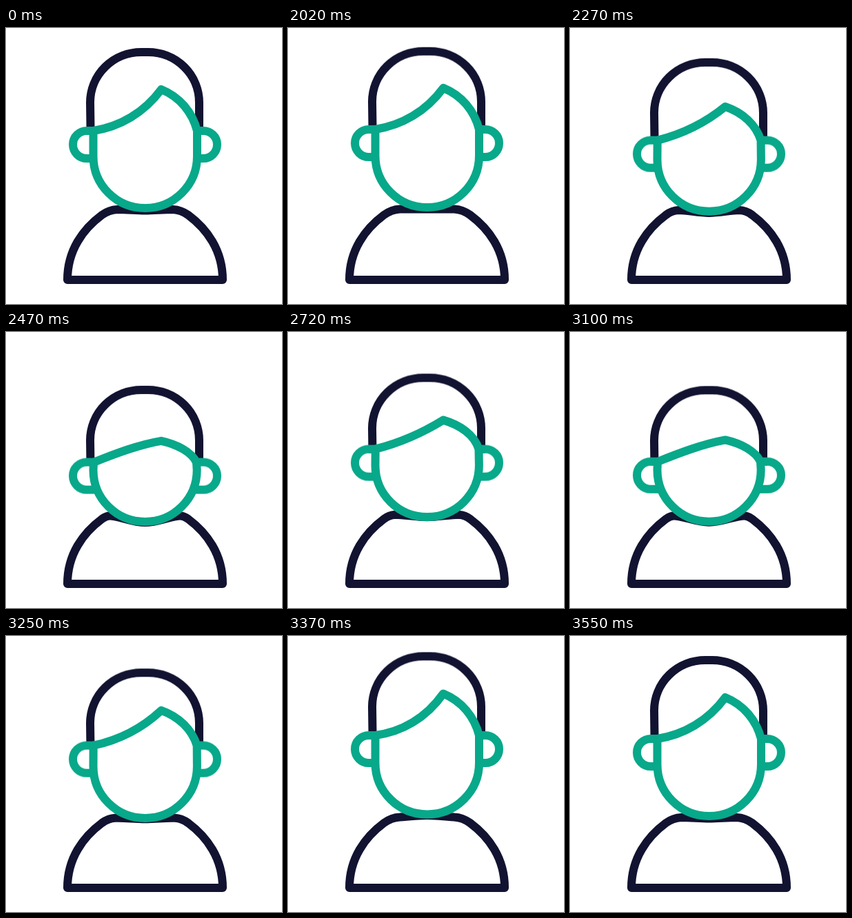
These frames come from a looping animation (400 by 400 pixels, 3.57 s). An HTML page without scripts:

```html
<!DOCTYPE html>
<html lang="en">
<head>
<meta charset="utf-8">
<title>Nodding avatar</title>
<style>
  html, body { margin: 0; width: 100%; height: 100%; overflow: hidden; background: #fff; }
  svg { display: block; width: 100%; height: 100%; }
  path { fill: none; stroke-width: 12; stroke-linejoin: round; }
  .dark { stroke: #121331; }
  .green { stroke: #08a88a; }
  .hair, .ears, .face, .body { animation: 3570ms ease-in-out infinite; }
  .hair { animation-name: hair; }
  .ears { animation-name: ears; }
  .face { animation-name: face; }
  .body { animation-name: body; }

  /* Rest, lift, nod, half rise, nod, overshoot, rest. Hair trails slightly. */
  @keyframes hair {
    0%, 56.5%, 99.44%, 100% { transform: translateY(0); }
    56.58% { transform: translateY(-1.2px); animation-timing-function: ease-out; }
    59.1% { transform: translateY(-4px); }
    70.03%, 86.55% { transform: translateY(49.5px); }
    78.43% { transform: translateY(28.4px); }
    94.96% { transform: translateY(-6px); }
  }
  @keyframes ears {
    0%, 56.5%, 99.44%, 100% { transform: translateY(0); }
    56.58% { transform: translateY(-2px); animation-timing-function: ease-out; }
    58.82% { transform: translateY(-4px); }
    69.61%, 85.99% { transform: translateY(39.7px); }
    78.01% { transform: translateY(18.7px); }
    94.4% { transform: translateY(-5px); }
  }
  @keyframes face {
    0%, 56.5%, 99.44%, 100% { d: path("M126.5 149C165 143 200 123 225 89C252 100 270 122 277 149L277 186C277 227.4 243.3 261 201.7 261C160 261 126.5 227.4 126.5 186Z"); }
    56.58% { d: path("M126.5 147C165 141 200 121 225 87C252 98 270 120 277 147L277 185C277 226.4 243.3 260 201.7 260C160 260 126.5 226.4 126.5 185Z"); animation-timing-function: ease-out; }
    58.82% { d: path("M126.5 145C165 139 200 119 225 84C252 95 270 117 277 145L277 184.5C277 226 243.3 259.5 201.7 259.5C160 259.5 126.5 226 126.5 184.5Z"); }
    69.61%, 85.99% { d: path("M127 189C160 175.5 192 163.5 225 158C248 163 269 174 276 189L276.7 200C276.7 241.5 243 275 201.7 275C160 275 126.5 241.5 126.5 200Z"); }
    78.01% { d: path("M126.7 167.7C162.6 159 196 144 225 124.5C250 132 270.5 147 276.5 167.7L276.9 192.5C276.9 233.9 243.2 267.3 201.7 267.3C160 267.3 126.5 233.9 126.5 192.5Z"); }
    94.4% { d: path("M126.5 144C165 139 200 119 225 83.5C252 94.5 270 117 277 144L277 184C277 225 243.3 258.5 201.7 258.5C160 258.5 126.5 225 126.5 184Z"); }
  }
  @keyframes body {
    0%, 56.5%, 99.44%, 100% { d: path("M89 365C89 322 112 291 139 271C146 266 152 263.5 161 263C175 263 188 264.5 201.5 264.5C215 264.5 228 263 242 263C251 263.5 257 266 264 271C291 291 314 322 314 365Z"); }
    56.58%, 58.82% { d: path("M89 365C89 322 112 291 139 271C146 266 152 263 162 262.5C175 262.5 188 262.5 201.5 262.5C215 262.5 228 262.5 241 262.5C251 263 257 266 264 271C291 291 314 322 314 365Z"); }
    69.61%, 85.99% { d: path("M89 365C89 322 112 291 139 271C142 269 145 266.5 150 266.5C164 266.5 182 276 201.5 276C221 276 239 266.5 253 266.5C258 266.5 261 269 264 271C291 291 314 322 314 365Z"); }
    78.01% { d: path("M89 365C89 322 112 291 139 271C144 267 149 265 156 264.5C170 264.5 185 267.5 201.5 267.5C218 267.5 233 264.5 247 264.5C254 265 259 267 264 271C291 291 314 322 314 365Z"); }
    94.4% { d: path("M89 365C89 322 112 291 139 271C146 266 152 263 162 262.5C175 261.5 188 260 201.5 260C215 260 228 261.5 241 262.5C251 263 257 266 264 271C291 291 314 322 314 365Z"); }
  }
</style>
</head>
<body>
<svg viewBox="0 0 400 400">
  <path class="dark body" d="M89 365C89 322 112 291 139 271C146 266 152 263.5 161 263C175 263 188 264.5 201.5 264.5C215 264.5 228 263 242 263C251 263.5 257 266 264 271C291 291 314 322 314 365Z"/>
  <path class="dark hair" d="M122.5 144L122 108A74 73 0 0 1 196 35H206A74 73 0 0 1 280 108V144"/>
  <path class="green ears" d="M130 149H117A20 20 0 0 0 117 189H130M274 149H286A20 20 0 0 1 286 189H274"/>
  <path class="green face" d="M126.5 149C165 143 200 123 225 89C252 100 270 122 277 149L277 186C277 227.4 243.3 261 201.7 261C160 261 126.5 227.4 126.5 186Z"/>
</svg>
</body>
</html>
```
